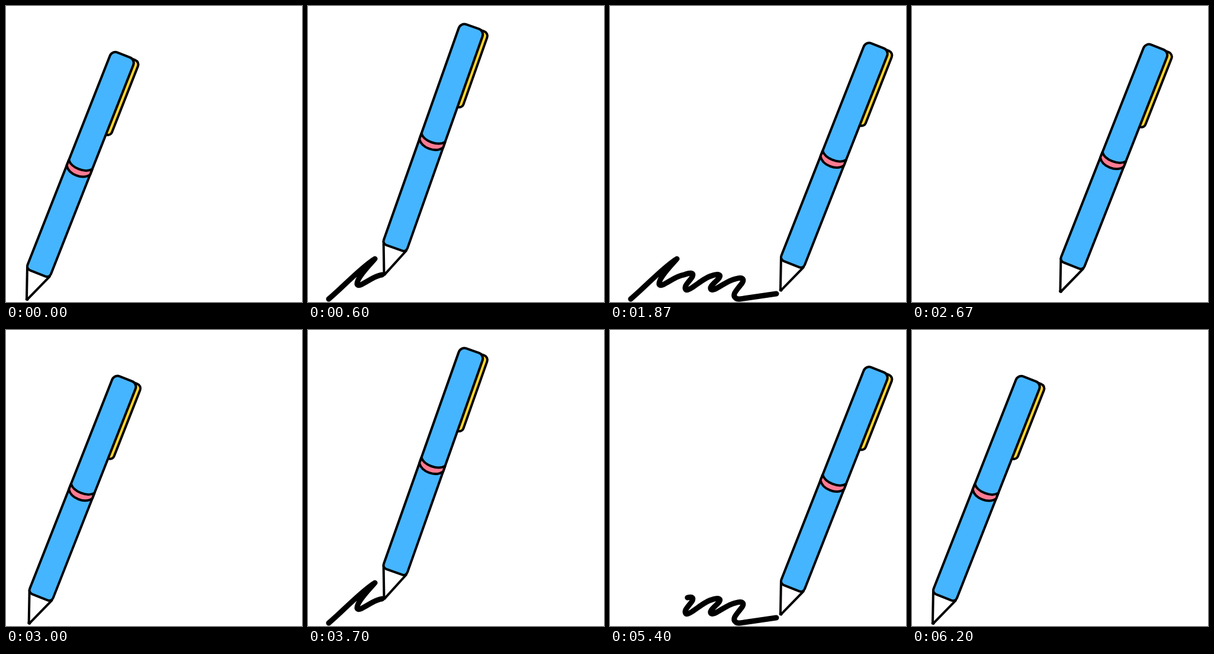
These frames come from a looping animation (500 by 500 pixels, 6.23 s). An HTML page with a canvas:

```html
<!DOCTYPE html>
<html lang="en">
<head>
<meta charset="utf-8">
<title>Writing pen</title>
<style>
  html, body { margin: 0; width: 100%; height: 100%; overflow: hidden; background: #fff; }
  canvas { display: block; width: 500px; height: 500px; }
</style>
</head>
<body>
<canvas id="stage" width="500" height="500"></canvas>
<script>
const ctx = document.getElementById('stage').getContext('2d');
const LOOP = 6230, CYCLE = 3100, WRITE_END = 1470;
const BLUE = '#45b5ff', PINK = '#ff7b93', YELLOW = '#ffd52e', INK = '#000';

// The scribble in three consecutive parts, so their lengths can pin the timing.
const parts = [
  'M35 495C60 474 90 441 113 427C104 438 82 459 83 470C86 478 108 456 125 454',
  'C138 449 143 451 138 459C133 466 124 474 128 479C133 484 157 459 171 456' +
  'C184 451 190 454 182 462C175 469 167 475 171 479C176 483 198 463 212 461' +
  'C225 457 229 462 220 472C213 481 206 488 212 493C215 496 220 495 226 494',
  'L281 486'
];
const makePath = d => {
  const path = document.createElementNS('http://www.w3.org/2000/svg', 'path');
  path.setAttribute('d', d);
  return path;
};
const lengthOf = d => makePath(d).getTotalLength();
const scribble = parts.join('');
const inkPath = new Path2D(scribble);
const total = lengthOf(scribble);
const firstLength = lengthOf(parts[0]);
const secondLength = lengthOf(parts[0] + parts[1]);

// The tip runs a little ahead of the ink and ends just past it.
const tipPath = makePath(scribble + 'L288 479.5');
const tipLead = tipPath.getTotalLength() - total;

const inkKeys = [[0, 0], [230, total * 0.07], [600, firstLength],
  [870, total * 0.7], [1167, secondLength], [WRITE_END, total]];
const tiltKeys = [[0, 0], [280, -3], [600, -2], [950, 2], [1167, 2], [WRITE_END, 0]];

const clamp = x => Math.min(1, Math.max(0, x));
const smooth = u => u * u * (3 - 2 * u);
const cubicInOut = u => u < 0.5 ? 4 * u ** 3 : 1 - 4 * (1 - u) ** 3;

// Hermite curve through [time, value] keys, at rest at both ends.
function follow(keys, t) {
  const last = keys.length - 1;
  if (t >= keys[last][0]) return keys[last][1];
  let i = 0;
  while (t >= keys[i + 1][0]) i++;
  const slope = k => k === 0 || k === last ? 0 :
    (keys[k + 1][1] - keys[k - 1][1]) / (keys[k + 1][0] - keys[k - 1][0]);
  const [t0, v0] = keys[i], [t1, v1] = keys[i + 1];
  const span = t1 - t0, u = (t - t0) / span, s = smooth(u);
  return v0 + (v1 - v0) * s +
    span * (slope(i) * u * (1 - u) ** 2 - slope(i + 1) * u * u * (1 - u));
}

function paint(fill) {
  ctx.fillStyle = fill;
  ctx.fill();
  ctx.stroke();
}

function box(x, y, w, h, radii, fill) {
  ctx.beginPath();
  ctx.roundRect(x, y, w, h, radii);
  paint(fill);
}

function drawInk(from, to) {
  if (to - from < 0.5) return;
  ctx.save();
  ctx.lineWidth = 9;
  ctx.setLineDash([to - from, total * 2]);
  ctx.lineDashOffset = -from;
  ctx.stroke(inkPath);
  ctx.restore();
}

// Pen in its own axes: tip at the origin, barrel pointing up.
function drawPen(x, y, degrees) {
  const left = -20.5, right = 22;
  ctx.save();
  ctx.translate(x, y);
  ctx.rotate(degrees * Math.PI / 180);
  ctx.lineWidth = 4;

  box(12, -443, 18, 135, [0, 8, 7, 0], YELLOW);

  ctx.beginPath();
  ctx.moveTo(left + 0.5, -52);
  ctx.lineTo(-1, -1);
  ctx.lineTo(1, -1);
  ctx.lineTo(right - 0.5, -50);
  ctx.closePath();
  paint('#fff');
  ctx.beginPath();
  ctx.arc(0, -0.5, 3, 0, Math.PI * 2);
  ctx.fillStyle = INK;
  ctx.fill();

  box(left, -444, right - left, 396.5, [10, 10, 7, 7], BLUE);

  ctx.beginPath();
  ctx.moveTo(left, -245);
  ctx.bezierCurveTo(-12, -234, 13, -234, right, -245);
  ctx.lineTo(right, -235);
  ctx.bezierCurveTo(13, -222, -12, -222, left, -235);
  ctx.closePath();
  paint(PINK);
  ctx.restore();
}

function draw(time) {
  // Thirty frames a second, every sixth one a repeat.
  let frame = Math.floor((time % LOOP) * 0.03 + 0.11);
  if (frame % 6 === 1) frame--;
  const t = (frame * 1000 / 30) % CYCLE;

  const written = follow(inkKeys, t);
  const erased = total * smooth(clamp((t - 2080) / 500));
  const back = 1 - cubicInOut(clamp((t - 2450) / 650));
  const point = tipPath.getPointAtLength(written * (1 + tipLead / total));
  const tipX = 35.5 + (point.x - 35) * back;
  const tipY = 495.5 + (point.y - 495) * back;

  ctx.fillStyle = '#fff';
  ctx.fillRect(0, 0, 500, 500);
  ctx.strokeStyle = INK;
  ctx.lineCap = ctx.lineJoin = 'round';
  drawInk(erased, written);
  drawPen(tipX, tipY, 21.5 + follow(tiltKeys, t));
}

function tick(now) {
  draw(now);
  requestAnimationFrame(tick);
}
draw(0);
requestAnimationFrame(tick);
</script>
</body>
</html>
```
